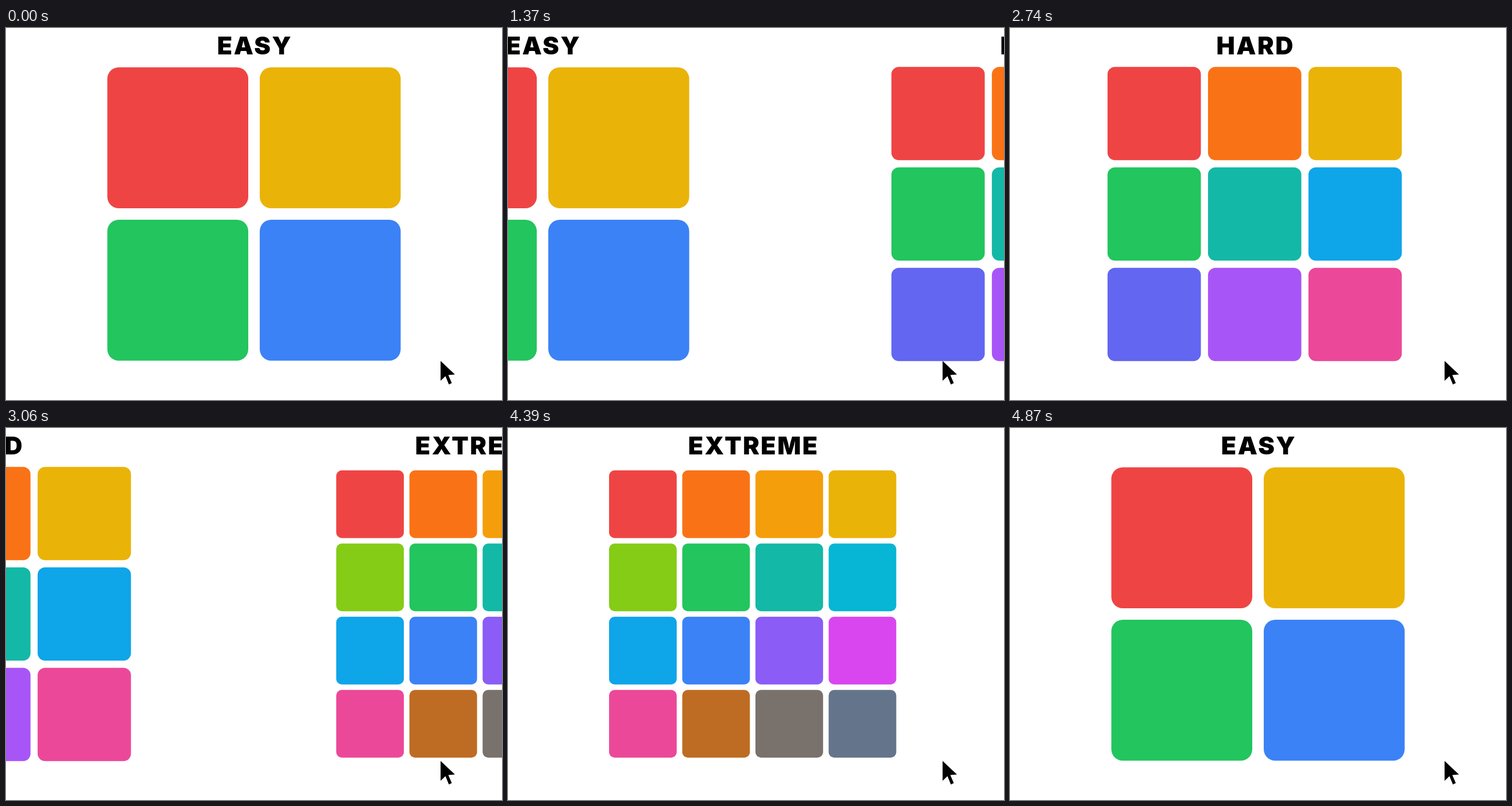
An HTML page that plays this animation: 864x648 px, repeating every 4.99 s.

```html
<!DOCTYPE html>
<html lang="en">
<head>
<meta charset="utf-8">
<title>Levels</title>
<style>
  html, body { margin: 0; width: 100%; height: 100%; overflow: hidden; background: #fff; }
  svg { display: block; width: 864px; height: 648px; }
  text { font: 900 43px Inter, "Liberation Sans", sans-serif; letter-spacing: 2.5px; text-anchor: middle; }
</style>
</head>
<body>
<svg viewBox="0 0 864 648">
  <g id="screens"></g>
  <path d="M757 580 782 603.5 770.5 604.5 776.5 618.5 771.5 621 765.5 606.5 757 614.5Z"/>
</svg>
<script>
const W = 864, LOOP = 4990, FIRST = 1090, PERIOD = 1650, STEP = 40, STEPS = 13;

const color = {
  red: '#ef4444', orange: '#f97316', amber: '#f59e0b', yellow: '#eab308',
  lime: '#84cc16', green: '#22c55e', teal: '#14b8a6', cyan: '#06b6d4',
  sky: '#0ea5e9', blue: '#3b82f6', indigo: '#6366f1', violet: '#8b5cf6',
  purple: '#a855f7', fuchsia: '#d946ef', pink: '#ec4899', brown: '#be6c23',
  stone: '#78716c', slate: '#64748b'
};

const levels = [
  { title: 'EASY', size: 245.5, pitch: 265.5, radius: 20,
    tiles: 'red yellow green blue' },
  { title: 'HARD', size: 162.6, pitch: 175, radius: 13,
    tiles: 'red orange yellow green teal sky indigo purple pink' },
  { title: 'EXTREME', size: 117.8, pitch: 127.5, radius: 9.5,
    tiles: 'red orange amber yellow lime green teal cyan sky blue violet fuchsia pink brown stone slate' }
];

function markup({ title, size, pitch, radius, tiles }) {
  const names = tiles.split(' ');
  const n = Math.sqrt(names.length);
  const half = ((n - 1) * pitch + size) / 2;
  const rects = names.map((name, i) => {
    const x = W / 2 - half + (i % n) * pitch;
    const y = 324 - half + Math.floor(i / n) * pitch;
    return `<rect x="${x}" y="${y}" width="${size}" height="${size}" rx="${radius}" fill="${color[name]}"/>`;
  });
  return `<g><text x="433.5" y="46">${title}</text>${rects.join('')}</g>`;
}

const root = document.getElementById('screens');
root.innerHTML = levels.map(markup).join('');
const screens = [...root.children];

// Each slide accelerates in fixed steps, then lands on the next screen.
function slide(ms) {
  const k = Math.floor(ms / STEP) + 1;
  if (k <= 0) return 0;
  return k < STEPS ? 5.81 * k * k : W;
}

function draw(now) {
  const t = now % LOOP;
  const span = W * screens.length;
  let scroll = 0;
  screens.forEach((_, i) => scroll += slide(t - FIRST - i * PERIOD));
  screens.forEach((screen, i) => {
    const x = (W * (i + 1) - scroll + span) % span - W;
    screen.setAttribute('transform', `translate(${x} 0)`);
  });
}

const start = performance.now();
function tick() {
  draw(performance.now() - start);
  requestAnimationFrame(tick);
}
tick();
</script>
</body>
</html>
```
